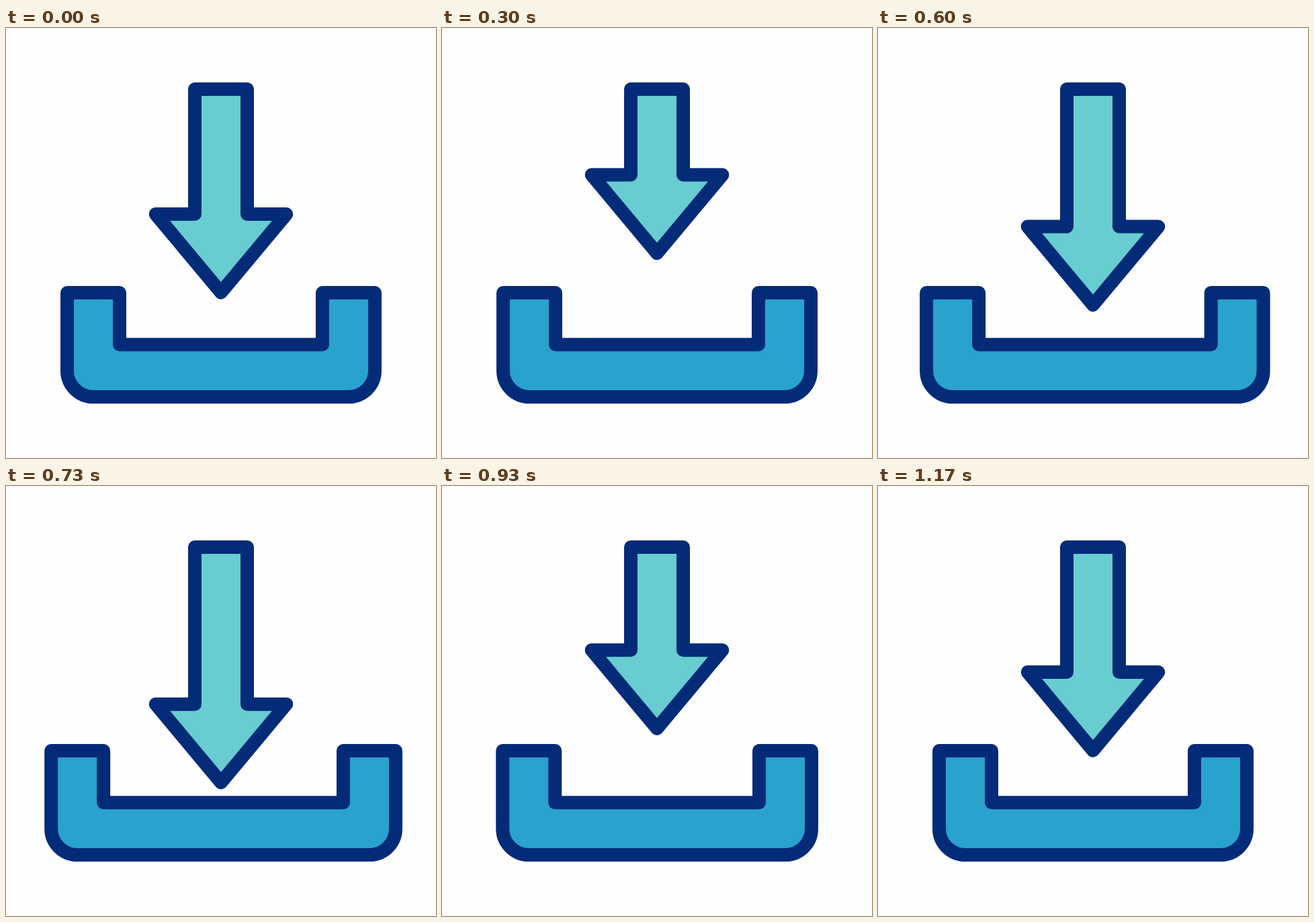
Recreate the animation shown at these times as an HTML page. Size 640 by 640 pixels, loop 1.5 s.

```html
<!DOCTYPE html>
<html lang="en">
<head>
<meta charset="utf-8">
<title>Download</title>
<style>
  html, body { margin: 0; width: 100%; height: 100%; overflow: hidden; background: #fefefe; }
  svg { display: block; width: 100vw; height: 100vh; }
  path { stroke: #032b77; stroke-width: 20; stroke-linejoin: round; }
  #arrow { fill: #67cdd0; }
  #tray { fill: #29a2ce; }
</style>
</head>
<body>
<svg viewBox="0 0 640 640">
  <path id="tray"/>
  <path id="arrow"/>
</svg>
<script>
  const LOOP = 1500, FPS = 30;
  const arrow = document.getElementById('arrow');
  const tray = document.getElementById('tray');

  const linear = u => u;
  const easeOut = u => 1 - (1 - u) ** 2.44;

  // Keys: [frame, value, easing towards this key]
  const drop = [[0, 0], [15, -65.5, easeOut], [20, 74.5, linear], [28.3, -36.8, linear], [35, 0, linear]];
  const spread = [[15, 0], [20, 1, linear], [28.2, 0, linear]];

  function valueAt(keys, f) {
    if (f <= keys[0][0]) return keys[0][1];
    for (let i = 1; i < keys.length; i++) {
      const [f0, v0] = keys[i - 1], [f1, v1, ease] = keys[i];
      if (f <= f1) return v0 + (v1 - v0) * ease((f - f0) / (f1 - f0));
    }
    return keys[keys.length - 1][1];
  }

  function arrowPath(dy) {
    const neck = 277 + dy;
    return `M281 91H359V${neck}H417.3L320 ${neck + 116.7}L222.7 ${neck}H281Z`;
  }

  // The right arm travels a little further than the left one.
  function trayPath(k) {
    const l = -31.5 * k, r = 41 * k;
    return `M${91 + l} 394H${169 + l}V471.3H${471 + r}V394H${549 + r}V510` +
      `A39 39 0 0 1 ${510 + r} 549H${130 + l}A39 39 0 0 1 ${91 + l} 510Z`;
  }

  function draw() {
    const t = performance.now() % LOOP;
    const frame = Math.floor((t + 4) * FPS / 1000) % (LOOP * FPS / 1000);
    arrow.setAttribute('d', arrowPath(valueAt(drop, frame)));
    tray.setAttribute('d', trayPath(valueAt(spread, frame)));
    requestAnimationFrame(draw);
  }
  draw();
</script>
</body>
</html>
```
